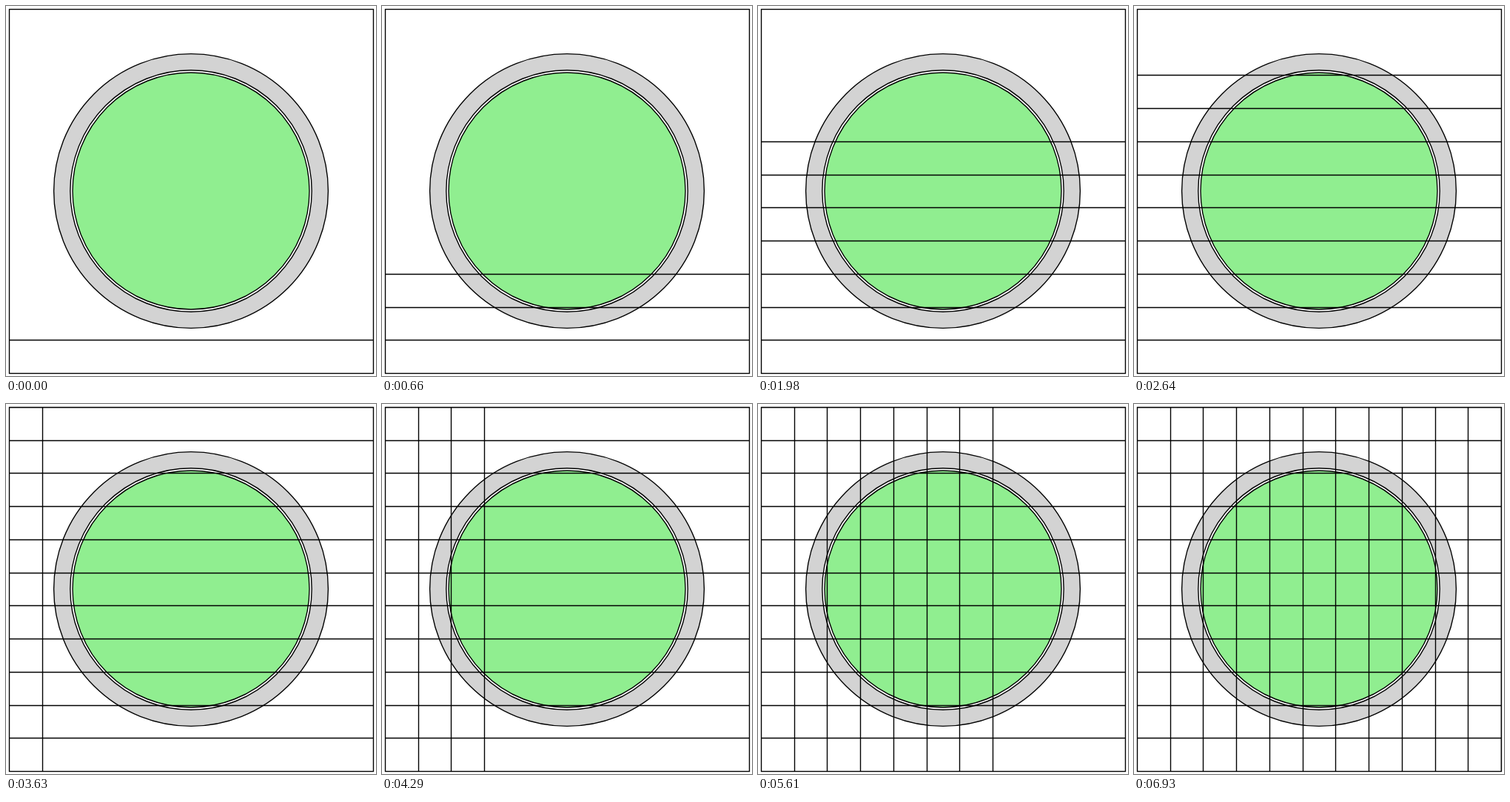
An HTML page with a canvas for the animation above (7.26 s loop, 500 by 500 pixels).

```html
<!DOCTYPE html>
<html lang="en">
<head>
<meta charset="utf-8">
<title>Grid over a disc</title>
<style>
  html, body { margin: 0; width: 100%; height: 100%; overflow: hidden; background: #fff; }
  canvas { display: block; }
</style>
</head>
<body>
<canvas id="stage" width="500" height="500"></canvas>
<script>
const ctx = document.getElementById('stage').getContext('2d');
const STEP = 330, CELLS = 11, LOW = 4, SIZE = 492;

// Grid position snapped to a pixel centre
const gridPos = i => Math.floor(LOW + SIZE * i / CELLS + 0.5) + 0.5;

function disc(radius, fill) {
  ctx.beginPath();
  ctx.arc(250, 250, radius, 0, 2 * Math.PI);
  ctx.fillStyle = fill;
  ctx.fill();
  ctx.stroke();
}

function line(x1, y1, x2, y2) {
  ctx.beginPath();
  ctx.moveTo(x1, y1);
  ctx.lineTo(x2, y2);
  ctx.stroke();
}

function draw(step) {
  ctx.fillStyle = '#fff';
  ctx.fillRect(0, 0, 500, 500);
  ctx.strokeStyle = '#000';
  ctx.lineWidth = 1.39;

  disc(185.4, '#d3d3d3');
  disc(163.2, '#fff');
  disc(160, '#90ee90');

  // Rows rise from the bottom, then columns go left to right
  ctx.save();
  ctx.beginPath();
  ctx.rect(LOW, LOW, SIZE, SIZE);
  ctx.clip();
  for (let i = 0; i <= step; i++) {
    if (i < CELLS) {
      const y = gridPos(CELLS - 1 - i);
      line(LOW, y, LOW + SIZE, y);
    } else {
      const x = gridPos(i - CELLS + 1);
      line(x, LOW, x, LOW + SIZE);
    }
  }
  ctx.restore();

  ctx.strokeRect(gridPos(0), gridPos(0), SIZE, SIZE);
}

const start = performance.now();
let shown = -1;

function tick() {
  const step = Math.floor((performance.now() - start) / STEP) % (2 * CELLS);
  if (step !== shown) draw(shown = step);
  requestAnimationFrame(tick);
}
tick();
</script>
</body>
</html>
```
